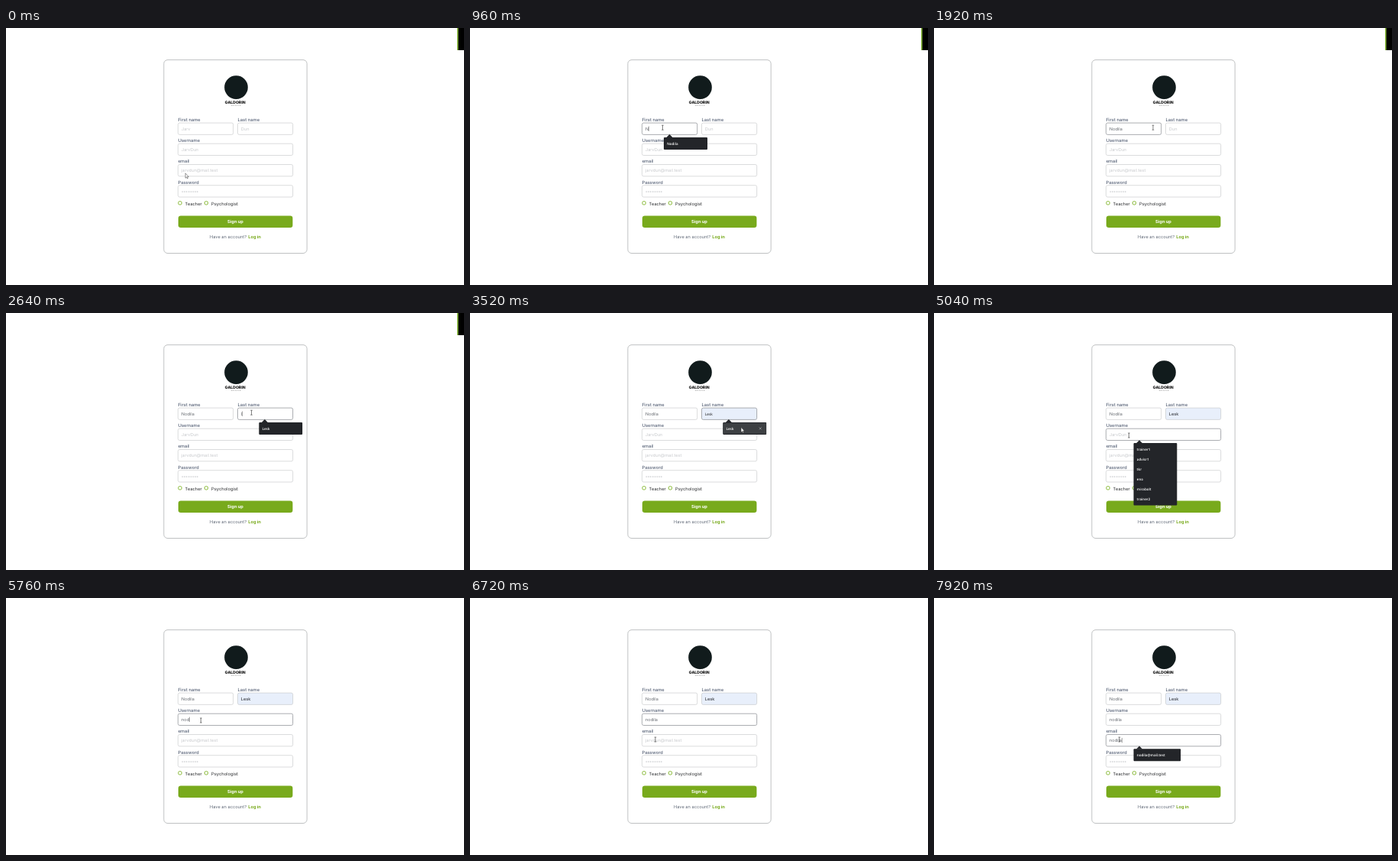
An HTML page for the animation above (8 s loop, 598x336 px).

```html
<!DOCTYPE html>
<html lang="en">
<head>
<meta charset="utf-8">
<title>Sign up</title>
<style>
  html, body { margin: 0; width: 100%; height: 100%; overflow: hidden; background: #fff; }
  svg { display: block; width: 100%; height: 100%; }
  text { font: 400 5.7px Inter, sans-serif; text-rendering: geometricPrecision; fill: #2c2e31; }
  .label { font-size: 5.8px; font-weight: 500; fill: #566176; }
  .hint { font-size: 5.6px; fill: #c8cacd; }
  .value { font-size: 5.6px; fill: #676b71; }
  .value.filled { fill: #202328; }
  .value.preview { font: 500 4.8px "Open Sans", sans-serif; fill: #111; }
  .box { fill: #fff; stroke: #c3c4c6; stroke-width: .6; }
  .box.focus { stroke: #96999d; stroke-width: .8; }
  .box.filled { fill: #e8effb; }
  .item { font: 600 4.55px "Open Sans", sans-serif; fill: #fff; }
  .radio { fill: #fff; stroke: #8cbc3c; stroke-width: 1; }
  .strong { font-weight: 700; }
</style>
</head>
<body>
<svg id="stage" viewBox="0 0 598 336">
  <rect x="206" y="41.7" width="187" height="252.8" rx="5" fill="#fff" stroke="#b8babc" stroke-width=".9"/>
  <g id="slab">
    <rect x="589" width="9" height="29" fill="#86b83a"/>
    <rect x="590.6" width="7.4" height="29" fill="#000"/>
  </g>

  <circle cx="300.5" cy="77.6" r="15.3" fill="#111b1c"/>
  <text x="299.2" y="99" text-anchor="middle" style="font-size:5.1px;font-weight:800;fill:#111">GALDORIN</text>
  <text x="300.6" y="102.2" text-anchor="middle" style="font-size:2.4px;letter-spacing:1.1px;fill:#666">HOUSE</text>

  <g id="form"></g>

  <circle class="radio" cx="227.2" cy="228.8" r="2.3"/>
  <text x="233.8" y="231.5">Teacher</text>
  <circle class="radio" cx="261.5" cy="228.8" r="2.3"/>
  <text x="268" y="231.5" style="font-size:5.8px">Psychologist</text>
  <rect x="225" y="245.5" width="149.3" height="15.5" rx="3.2" fill="#78aa1c"/>
  <text class="strong" x="299.5" y="255.3" text-anchor="middle" style="fill:#fff">Sign up</text>
  <text x="266" y="275.2" style="fill:#626b79">Have an account?</text>
  <text class="strong" x="316.2" y="275.2" style="fill:#78aa1c">Log in</text>

  <g id="lists"></g>
  <rect id="caret" width=".5" height="6.4" fill="#444"/>
  <path id="arrow" d="M0 0V6.4L1.5 5.1 2.4 7.1 3.3 6.7 2.4 4.7H4.3Z" fill="#fff" stroke="#333" stroke-width=".5"/>
  <path id="beam" d="M-1.3 -3H1.3M0 -3V3M-1.3 3H1.3" fill="none" stroke="#333" stroke-width=".6"/>
</svg>
<script>
const LOOP = 8000;
const $ = id => document.getElementById(id);

function add(parent, tag, attrs, text = '') {
  const node = document.createElementNS('http://www.w3.org/2000/svg', tag);
  for (const key in attrs) node.setAttribute(key, attrs[key]);
  node.textContent = text;
  return parent.appendChild(node);
}

function show(node, visible) {
  node.setAttribute('visibility', visible ? 'visible' : 'hidden');
}

function makeField(label, hint, x, y, w, more = {}) {
  const form = $('form');
  add(form, 'text', { class: 'label', x, y: y - 2.2 }, label);
  const box = add(form, 'rect', { class: 'box', x, y, width: w, height: 15.3, rx: 2 });
  const hintNode = add(form, 'text', { class: 'hint', x: x + 4.3, y: y + 9.8 }, hint);
  const valueNode = add(form, 'text', { class: 'value', x: x + 4.3, y: y + 9.8 });
  return { x, y, w, box, hintNode, valueNode, text: '', keys: [], focus: [-1, -1], ...more };
}

const fields = [
  makeField('First name', 'Jarv', 224.7, 124.1, 72,
    { text: 'Nodila', keys: [960, 1040, 1120, 1200, 1280, 1360], focus: [720, 2320] }),
  makeField('Last name', 'Dun', 302.5, 124.1, 72,
    { text: 'l', keys: [2560], focus: [2320, 4560], fill: 'Lesk', fillAt: 4160 }),
  makeField('Username', 'JarvDun', 224.7, 151.2, 149.8,
    { text: 'nodila', keys: [5280, 5440, 5680, 5920, 6160, 6320], focus: [4560, 6880] }),
  makeField('email', 'jarvdun@mail.test', 224.7, 178.5, 149.8,
    { text: 'nodila', keys: [7200, 7360, 7520, 7600, 7760, 7840], focus: [6880, LOOP] }),
  makeField('Password', '********', 224.7, 205.7, 149.8)
];
fields[4].hintNode.setAttribute('y', 216.6);

function makeList(x, y, w, from, to, items) {
  const group = add($('lists'), 'g', {});
  const height = 3 + 13.1 * items.length;
  add(group, 'path', { d: `M${x + 3.5} ${y + .2}l4 -4 4 4z`, fill: '#232529' });
  add(group, 'rect', { x, y, width: w, height, rx: 1, fill: '#232529' });
  const hover = add(group, 'g', {});
  add(hover, 'rect', { x, y: y + 1, width: w, height: 14, fill: '#3d4043' });
  add(hover, 'path', {
    d: `M${x + w - 9.4} ${y + 6.5}l3 3m0 -3l-3 3`, stroke: '#b5b7ba', 'stroke-width': .6
  });
  items.forEach((item, i) =>
    add(group, 'text', { class: 'item', x: x + 4.2, y: y + 9.6 + 13.1 * i }, item));
  return { x, y, w, height, from, to, group, hover };
}

const names = ['trainer1', 'advisr1', 'tkr', 'eno', 'mirabolt', 'trainer2'];
const mails = ['trainer1@mail.test', 'advisr1@mail.test', 'tkr@mail.test',
  'nodila@mail.test', 'mirabolt.office@mail.test', 'trainer2@mail.test'];
const lists = [
  makeList(253, 142.9, 57, 960, 1360, ['Nodila']),
  makeList(330.3, 142.9, 56.7, 2560, 4160, ['Lesk']),
  makeList(260.6, 170, 56.7, 4720, 5280, names),
  makeList(260.6, 197.2, 87, 6960, 7200, mails),
  makeList(260.6, 197.2, 61.5, 7200, LOOP, ['nodila@mail.test'])
];

// Pointer moves: start, end, destination
const moves = [
  [80, 720, 251.5, 130.2],
  [1520, 2320, 320.5, 130.2],
  [2720, 3520, 354, 149.6],
  [4160, 4560, 254.5, 160],
  [6480, 6720, 242, 185]
];

const progress = (t, a, b) => Math.min(1, Math.max(0, (t - a) / (b - a)));
const ease = p => p * p * (3 - 2 * p);
const during = (t, [from, to]) => t >= from && t < to;
const inside = ([px, py], x, y, w, h) => px >= x && px <= x + w && py >= y && py <= y + h;

function pointerAt(t) {
  let [x, y] = [234.2, 189.8];
  for (const [from, to, tx, ty] of moves) {
    const p = ease(progress(t, from, to));
    x += (tx - x) * p;
    y += (ty - y) * p;
  }
  return [x, y];
}

function render(t) {
  const pointer = pointerAt(t);
  let hovering = false;
  for (const list of lists) {
    const open = during(t, [list.from, list.to]);
    const over = open && inside(pointer, list.x, list.y, list.w, list.height);
    show(list.group, open);
    show(list.hover, over);
    hovering ||= over;
  }

  show($('caret'), false);
  for (const field of fields) {
    const { box, hintNode, valueNode, keys } = field;
    const count = keys.filter(key => key <= t).length;
    const focused = during(t, field.focus);
    const committed = t >= field.fillAt;
    const preview = !!field.fill && hovering && !committed;
    const filled = committed || preview;
    const value = filled ? field.fill : field.text.slice(0, count);

    box.setAttribute('class', `box${focused ? ' focus' : ''}${filled ? ' filled' : ''}`);
    valueNode.setAttribute('class', `value${committed ? ' filled' : ''}${preview ? ' preview' : ''}`);
    if (valueNode.textContent !== value) valueNode.textContent = value;
    show(hintNode, !value);

    if (focused && count && !filled && t - keys[count - 1] < 400) {
      const x = field.x + 4.5 + valueNode.getComputedTextLength();
      $('caret').setAttribute('x', x);
      $('caret').setAttribute('y', field.y + 4.4);
      show($('caret'), true);
    }
  }

  const beam = t >= 80 && !hovering && fields.some(f => inside(pointer, f.x, f.y, f.w, 15.3));
  for (const id of ['arrow', 'beam']) {
    $(id).setAttribute('transform', `translate(${pointer})`);
    show($(id), beam === (id === 'beam'));
  }
  $('slab').setAttribute('transform', `translate(${10 * progress(t, 3280, 3520)})`);
}

let start;
function tick(now) {
  start ??= now;
  render((now - start) % LOOP);
  requestAnimationFrame(tick);
}
render(0);
requestAnimationFrame(tick);
</script>
</body>
</html>
```
